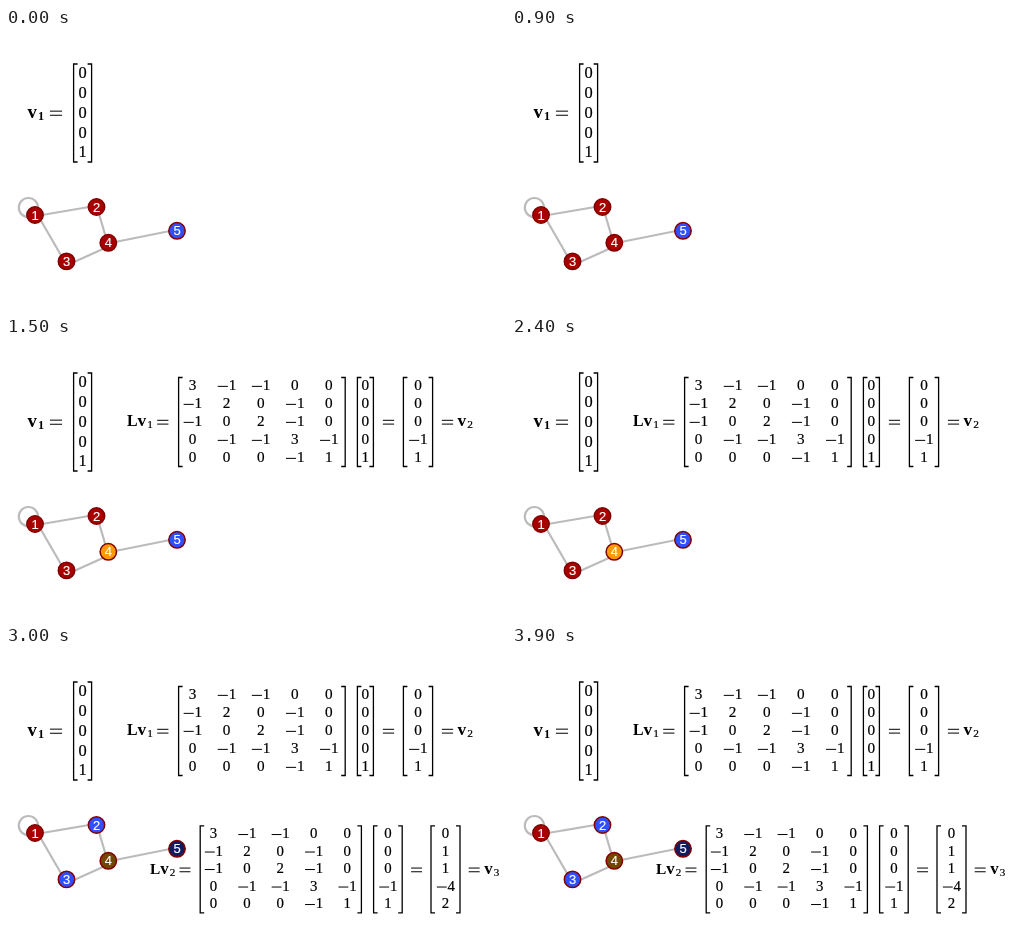
Write an HTML page that moves like this. It is 500 px wide and 281 px high and loops after 4.5 s.

```html
<!DOCTYPE html>
<html lang="en">
<head>
<meta charset="utf-8">
<title>Graph Laplacian</title>
<style>
  html, body { margin: 0; width: 100%; height: 100%; overflow: hidden; background: #fff; }
  svg { display: block; width: 100%; height: 100%; }
  text { font-family: "Liberation Serif", serif; stroke: #000; stroke-width: .2; }
  .b { font-weight: bold; stroke: none; }
  .m { text-anchor: middle; }
  .node { font: 13px "Liberation Sans", sans-serif; fill: #fff; stroke: #fff; text-anchor: middle; }
</style>
</head>
<body>
<svg id="stage" viewBox="0 0 500 281"></svg>
<script>
const stage = document.getElementById('stage');
const STEP = 1500, STEPS = 3;

function add(parent, tag, attrs, text) {
  const el = document.createElementNS('http://www.w3.org/2000/svg', tag);
  for (const k in attrs) el.setAttribute(k, attrs[k]);
  if (text !== undefined) el.textContent = text;
  return parent.appendChild(el);
}

// Holds each value for one step, then jumps to the next.
function cycle(el, prop, values) {
  const frames = values.map((v, i) => ({ [prop]: v, offset: i / STEPS, easing: 'step-end' }));
  frames.push({ [prop]: values[STEPS - 1], offset: 1 });
  el.animate(frames, { duration: STEP * STEPS, iterations: Infinity });
}

function stroke(g, d, width) {
  add(g, 'path', { d, fill: 'none', stroke: '#000', 'stroke-width': width });
}

function entry(g, n, x, y, size) {
  const neg = n < 0;
  add(g, 'text', { x: x + (neg ? .389 * size : 0), y: y + .338 * size, 'font-size': size, class: 'm' }, Math.abs(n));
  if (neg) stroke(g, `M${x - .583 * size} ${y + .09 * size}h${.666 * size}`, 1);
}

function equals(g, x, y, size) {
  const w = .74 * size, d = .125 * size;
  stroke(g, `M${x - w / 2} ${y - d}h${w}m${-w} ${2 * d}h${w}`, 1);
}

function brackets(g, left, right, top, bottom) {
  stroke(g, `M${left + 4} ${top}h-4V${bottom}h4M${right - 4} ${top}h4V${bottom}h-4`, 1.3);
}

function matrix(g, rows, cols, y, gap, size) {
  rows.forEach((row, r) => row.forEach((n, c) => entry(g, n, cols[c], y + r * gap, size)));
}

function vec(g, x, y, size, sub, bold) {
  add(g, 'text', { x, y, 'font-size': size * 1.14, class: 'b' }, 'v');
  add(g, 'text', { x: x + .64 * size, y: y + 2.2, 'font-size': size * .75, class: bold ? 'b' : '' }, sub);
}

const L = [
  [3, -1, -1, 0, 0],
  [-1, 2, 0, -1, 0],
  [-1, 0, 2, -1, 0],
  [0, -1, -1, 3, -1],
  [0, 0, 0, -1, 1]
];
const apply = v => L.map(row => row.reduce((sum, n, i) => sum + n * v[i], 0));
const column = v => v.map(n => [n]);
const v1 = [0, 0, 0, 0, 1], v2 = apply(v1), v3 = apply(v2);

function product(o) {
  const g = add(stage, 'g', {});
  const { x, top, bottom, y, gap, size, base } = o;
  add(g, 'text', { x, y: base, 'font-size': size * 1.04, class: 'b' }, 'L');
  vec(g, x + .69 * size, base, size, o.index);
  const put = (rows, cols, left, right) => {
    brackets(g, left, right, top, bottom);
    matrix(g, rows, cols, y, gap, size);
  };
  put(L, [0, 1, 2, 3, 4].map(i => o.col + i * o.colGap), o.box[0], o.box[1]);
  put(column(o.input), [(o.box[2] + o.box[3]) / 2], o.box[2], o.box[3]);
  put(column(o.output), [(o.box[4] + o.box[5]) / 2], o.box[4], o.box[5]);
  o.eq.forEach(e => equals(g, e, base - .25 * size, size));
  vec(g, o.end, base, size, o.index + 1);
  cycle(g, 'opacity', o.show);
}

// Starting vector
vec(stage, 21.5, 89.6, 16.4, 1, true);
equals(stage, 50, 85.2, 16.4);
brackets(stage, 67.6, 85.6, 36, 134);
matrix(stage, column(v1), [76.5], 44.8, 19.75, 16.4);

// Graph
const nodes = [[29, 187], [90.5, 179], [60.5, 233.4], [102.3, 214.8], [171, 202.8]];
const edges = ['M36 187L83 179', 'M34 191L56 229', 'M93 186L99.5 208', 'M68 234L98 220.5', 'M109 214L164 203'];
const RED = '#a80000', BLUE = '#3050ff';
const fills = [
  [RED, RED, RED],
  [RED, RED, BLUE],
  [RED, RED, BLUE],
  [RED, '#ff9900', '#744600'],
  [BLUE, BLUE, '#101c60']
];
const grey = { fill: 'none', stroke: '#bbb', 'stroke-width': 2.2 };
add(stage, 'circle', { cx: 22.4, cy: 179.6, r: 9.6, ...grey });
for (const d of edges) add(stage, 'path', { d, ...grey });
nodes.forEach(([cx, cy], i) => {
  const dot = add(stage, 'circle', { cx, cy, r: 8.2, fill: fills[i][0], stroke: '#800000', 'stroke-width': 1.5 });
  cycle(dot, 'fill', fills[i]);
  add(stage, 'text', { x: cx, y: cy + 4.6, class: 'node' }, i + 1);
});

// Products
product({
  x: 121, base: 89, size: 15.2, index: 1, top: 40.5, bottom: 129.5, y: 48, gap: 18,
  col: 186.5, colGap: 34.1, box: [172.6, 339.2, 351.4, 367.4, 397.4, 426.6],
  eq: [156.8, 382.5, 441.5], end: 451.5, input: v1, output: v2, show: [0, 1, 1]
});
product({
  x: 144, base: 227.6, size: 14.8, index: 2, top: 179.8, bottom: 266.8, y: 187.2, gap: 17.5,
  col: 207.5, colGap: 33.4, box: [194.2, 355.4, 367.6, 396.2, 425, 454],
  eq: [179, 410.6, 468.2], end: 478.3, input: v2, output: v3, show: [0, 0, 1]
});
</script>
</body>
</html>
```
